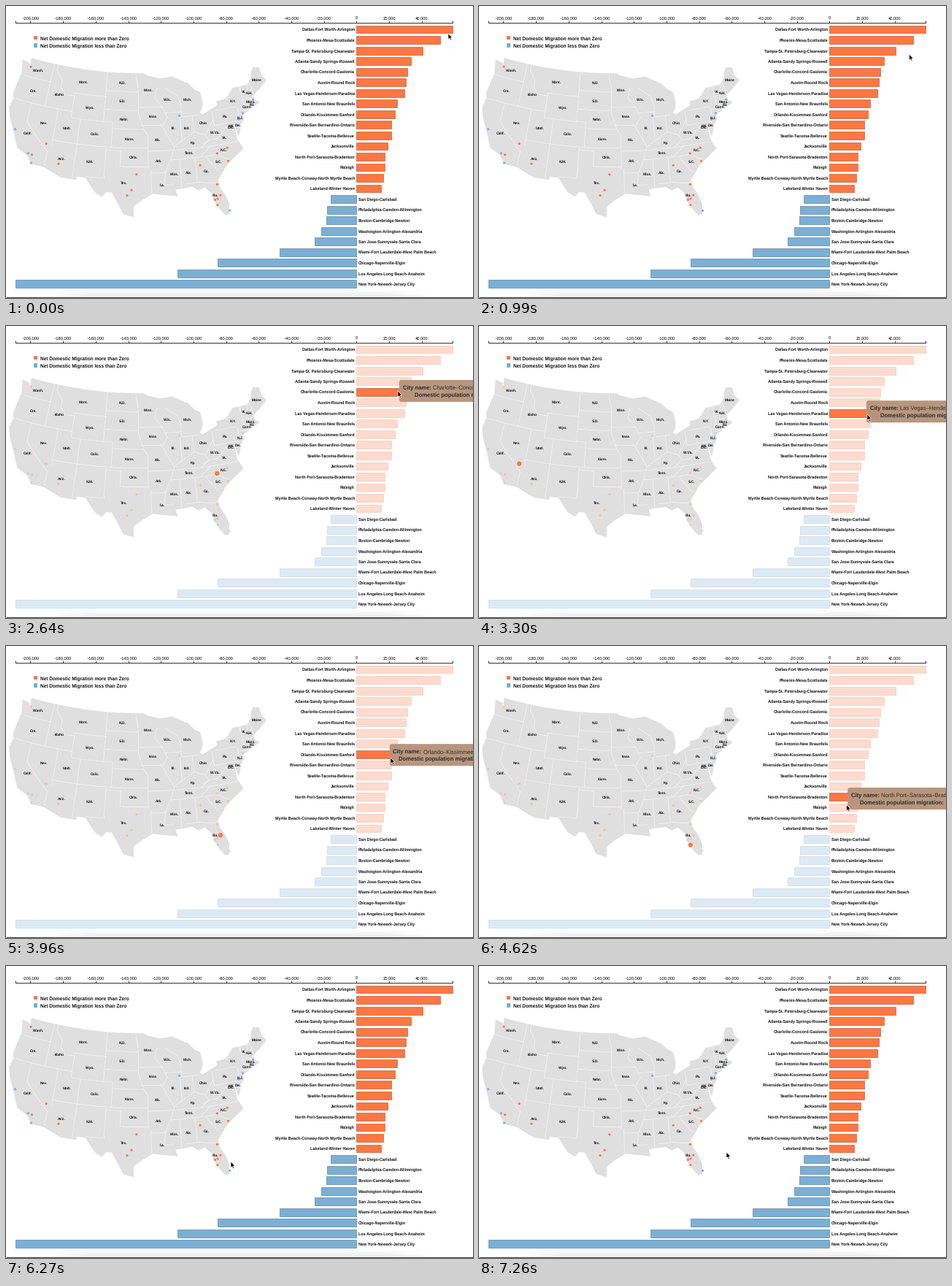
A matplotlib script that plays this animation: 640 by 400 pixels, repeating every 7590 ms.

```python
import numpy as np
import matplotlib
import matplotlib.pyplot as plt
from matplotlib.animation import FuncAnimation
from matplotlib.colors import to_rgb
from matplotlib.patches import Circle, FancyBboxPatch, Polygon, Rectangle

matplotlib.rcParams["font.family"] = "Liberation Sans"
matplotlib.rcParams["text.hinting"] = "none"

W, H, DPI = 640, 400, 100
FRAMES, STEP = 23, 330
PX = 72 / DPI
ORANGE, BLUE = "#ff7743", "#7bafd4"
LAND, TIP, INK = "#dfdfdf", "#b6937a", "#111111"
ZERO, UNIT = 480.4, 2.235 / 1000
BAR_H = 10.8
LAG = 0.3  # the page answers the pointer this many steps late

# name, state, migration, longitude, latitude
CITIES = [
    ("Dallas-Fort Worth-Arlington", "TX", 58849, -96.8, 32.8),
    ("Phoenix-Mesa-Scottsdale", "AZ", 51311, -112, 33.4),
    ("Tampa-St. Petersburg-Clearwater", "FL", 40502, -82.5, 27.9),
    ("Atlanta-Sandy Springs-Roswell", "GA", 33203, -84.4, 33.7),
    ("Charlotte-Concord-Gastonia", "NC–SC", 31190, -80.8, 35.2),
    ("Austin-Round Rock", "TX", 30103, -97.7, 30.3),
    ("Las Vegas-Henderson-Paradise", "NV", 29408, -115.1, 36.2),
    ("San Antonio-New Braunfels", "TX", 24890, -98.5, 29.4),
    ("Orlando-Kissimmee-Sanford", "FL", 23318, -81.4, 28.5),
    ("Riverside-San Bernardino-Ontario", "CA", 21304, -117.4, 34),
    ("Seattle-Tacoma-Bellevue", "WA", 21099, -122.3, 47.6),
    ("Jacksonville", "FL", 18858, -81.7, 30.3),
    ("North Port-Sarasota-Bradenton", "FL", 17363, -82.2, 27),
    ("Raleigh", "NC", 17251, -78.6, 35.8),
    ("Myrtle Beach-Conway-North Myrtle Beach", "SC–NC", 16463, -78.9, 33.7),
    ("Lakeland-Winter Haven", "FL", 15102, -82, 28),
    ("San Diego-Carlsbad", "CA", -15822, -117.2, 32.7),
    ("Philadelphia-Camden-Wilmington", "PA–NJ–DE–MD", -18288, -75.2, 39.9),
    ("Boston-Cambridge-Newton", "MA–NH", -18304, -71.1, 42.4),
    ("Washington-Arlington-Alexandria", "DC–VA–MD–WV", -21620, -77, 38.9),
    ("San Jose-Sunnyvale-Santa Clara", "CA", -25803, -121.9, 37.3),
    ("Miami-Fort Lauderdale-West Palm Beach", "FL", -47177, -80.2, 25.8),
    ("Chicago-Naperville-Elgin", "IL–IN–WI", -85308, -87.6, 41.9),
    ("Los Angeles-Long Beach-Anaheim", "CA", -109805, -118.2, 34.1),
    ("New York-Newark-Jersey City", "NY–NJ–PA", -209000, -74, 40.7),
]

STATES = [
    ("Wash.", 44, 88), ("Ore.", 37, 116), ("Idaho", 73, 121), ("Mont.", 106, 104),
    ("N.D.", 159, 105), ("S.D.", 159, 130), ("Minn.", 195, 115), ("Wis.", 221, 128),
    ("Mich.", 249, 128), ("Maine", 343, 101), ("N.Y.", 311, 130), ("Vt.", 326, 117),
    ("N.H.", 333, 119), ("Mass.", 335, 131), ("Conn.", 330, 138), ("R.I.", 337, 135),
    ("Pa.", 300, 151), ("N.J.", 321, 153), ("Del.", 318, 163), ("Md.", 309, 164),
    ("D.C.", 308, 166), ("Ohio", 270, 160), ("Ind.", 248, 167), ("Ill.", 229, 167),
    ("Iowa", 201, 151), ("Nebr.", 161, 155), ("Wyo.", 114, 139), ("Nev.", 51, 160),
    ("Utah", 83, 167), ("Calif.", 29, 174), ("Colo.", 122, 175), ("Kans.", 169, 182),
    ("Mo.", 208, 183), ("Ky.", 256, 187), ("W.Va.", 286, 173), ("Va.", 299, 180),
    ("N.C.", 298, 197), ("S.C.", 291, 213), ("Tenn.", 251, 201), ("Ga.", 274, 226),
    ("Ala.", 250, 228), ("Miss.", 230, 230), ("Ark.", 209, 212), ("Okla.", 174, 207),
    ("La.", 214, 245), ("Tex.", 161, 242), ("Fla.", 287, 259), ("Ariz.", 76, 209),
    ("N.M.", 115, 213),
]

# outline as (longitude, latitude), clockwise from the northwest
NORTH = [
    (-124.7, 48.4), (-122.8, 48.1), (-122.4, 47.4), (-122.8, 49), (-95.2, 49),
    (-94.6, 48.7), (-91.5, 48.1), (-88.4, 48.3), (-84.9, 46.9), (-83.5, 45.8),
    (-82.4, 45.3), (-82.1, 43.6), (-82.5, 42.6), (-83.1, 42), (-82.5, 41.7),
    (-79, 42.8), (-79.2, 43.4), (-76.8, 43.6), (-75, 45), (-71.5, 45),
    (-70.3, 45.9), (-70, 46.7), (-69.2, 47.4), (-67.8, 47.1), (-67.8, 45.7),
]
ATLANTIC = [
    (-67, 44.8), (-70.6, 43.1), (-71, 42.3), (-70.1, 42), (-70, 41.6),
    (-73.6, 41), (-72, 41), (-74, 40.5), (-74.1, 39.7), (-74.9, 39),
    (-75.4, 39.5), (-75.1, 38.5), (-75.9, 37.2), (-76.3, 39.3), (-76.3, 37),
    (-75.5, 35.2), (-77.9, 33.9), (-79.2, 33.2), (-81.4, 31), (-81.3, 29.8),
    (-80.5, 28.4), (-80.1, 26.9), (-80.4, 25.2), (-81.1, 25.2),
]
SOUTH_WEST = [
    (-81.8, 26.1), (-82.8, 27.9), (-82.7, 28.8), (-84.1, 30.1), (-85.2, 29.7),
    (-86.3, 30.4), (-89.5, 30.2), (-89.2, 29.1), (-91.3, 29.4), (-93.8, 29.7),
    (-95.9, 28.6), (-97.3, 27.6), (-97.2, 25.9), (-99.1, 26.4), (-100.3, 28.3),
    (-101.4, 29.8), (-102.4, 29.8), (-103.1, 29), (-104.5, 29.6), (-106.5, 31.8),
    (-108.2, 31.8), (-108.2, 31.3), (-111.1, 31.3), (-114.8, 32.5), (-117.1, 32.5),
    (-118.4, 33.8), (-120.5, 34.5), (-121.9, 36.6), (-123.7, 39), (-124.4, 40.4),
    (-124.1, 42), (-124.5, 42.8), (-124, 46.2),
]

# state lines along a parallel: latitude, from, to
PARALLELS = [
    (46, -124, -117), (42, -124.2, -111), (45, -111, -104), (41, -111, -102),
    (37, -114, -94.6), (46, -104, -96.5), (43, -104, -96.5), (40, -102, -95.3),
    (36.5, -103, -100), (34, -100, -94.5), (32, -106.6, -103), (43.5, -96.5, -91.2),
    (40.6, -95.8, -91.4), (36.5, -94.6, -76), (33, -94, -91.2), (35, -90.1, -83.1),
    (42.5, -90.6, -87), (41.7, -87, -83.4), (39.7, -80.5, -75.4), (42, -79.8, -75.3),
    (42.7, -73.3, -70.8), (42, -73.5, -71.4), (31, -91.6, -89.7), (31, -87.6, -85),
]
# state lines along a meridian: longitude, from, to
MERIDIANS = [
    (-117, 42, 49), (-111, 41, 45), (-104, 41, 49), (-102, 37, 41), (-109, 31.3, 41),
    (-114, 36, 42), (-120, 39, 42), (-103, 32, 37), (-100, 34, 36.5),
    (-94.5, 33.6, 39.1), (-94, 29.7, 33.6), (-87.5, 38, 41.7), (-84.8, 39.1, 41.7),
    (-80.5, 39.7, 42), (-88.3, 30.3, 35), (-85.3, 31, 35), (-73.4, 41, 45),
    (-75.7, 38.5, 39.7),
]
# rivers and ridges
WINDING = [
    [(-120, 39), (-114.6, 35), (-114.7, 32.7)],
    [(-116, 49), (-116, 48), (-114.4, 46.6), (-114.4, 45.5), (-113, 44.5), (-111, 44.5)],
    [(-97.2, 49), (-96.5, 46), (-96.5, 42.5), (-95.3, 40), (-94.6, 39.1)],
    [(-92.1, 46.7), (-92.8, 45), (-91.2, 43.5), (-90.2, 41.8), (-91.4, 40.4),
     (-89.2, 37), (-90.1, 35), (-91.2, 33), (-91.6, 31)],
    [(-90.4, 46.5), (-87.6, 45.1), (-87, 43.5), (-87.2, 41.7)],
    [(-89.2, 37), (-87.5, 37.9), (-84.8, 39.1), (-82.6, 38.4), (-80.5, 40.6)],
    [(-82.6, 38.4), (-82, 37.5), (-80.3, 37.5), (-77.8, 39.3), (-76.3, 38)],
    [(-84.3, 35), (-81.7, 36.6)],
    [(-83.7, 36.6), (-82, 37.5)],
    [(-83.1, 35), (-81, 35.1), (-78.6, 33.9)],
    [(-83.1, 35), (-80.9, 32.1)],
    [(-85, 31), (-82.2, 30.6), (-81.4, 30.7)],
    [(-75.3, 42), (-74.7, 41.4), (-75.4, 39.7)],
    [(-71.5, 45), (-72.5, 42.7)],
    [(-71, 45.3), (-70.7, 43.1)],
]

# pointer path: step, x, y
PATH = np.array([
    (0, 606, 37.6), (1, 597, 33), (3, 589.5, 66), (5, 546, 77), (6, 562, 82),
    (8, 537, 89), (12, 527, 153), (15, 492, 250), (16, 329.5, 273),
    (16.7, 294, 259), (18.7, 309, 276), (19, 308, 268), (22, 339, 255),
])
ARROW = np.array([(0, 0), (0, 8.2), (1.9, 6.5), (3.2, 9.4), (4.5, 8.8),
                  (3.3, 6), (5.8, 5.9)])


def project(points):
    """Albers equal-area conic, scaled to the stage; long lines stay curved."""
    lon, lat = np.array(points, float).T
    t = np.arange(len(lon))
    fine = np.linspace(0, t[-1], t[-1] * 12 + 1)
    lon, lat = np.interp(fine, t, lon), np.interp(fine, t, lat)
    s1, s2 = np.sin(np.radians([29.5, 45.5]))
    n = (s1 + s2) / 2
    rho = np.sqrt(1 - s1 ** 2 + 2 * n * s1 - 2 * n * np.sin(np.radians(lat))) / n
    theta = n * np.radians(lon + 96)
    return np.column_stack((184.6 + 489 * rho * np.sin(theta),
                            -445.5 + 488 * rho * np.cos(theta)))


def label(x, y, text, px, ha="left", weight="bold", color=INK, z=5):
    """Text whose capitals are centred on y."""
    return ax.text(x, y + 0.38 * px, text, fontsize=px * PX, ha=ha,
                   va="baseline", weight=weight, color=color, zorder=z)


def line(xs, ys, color, px, z=2):
    ax.plot(xs, ys, color=color, lw=px * PX, zorder=z, solid_capstyle="butt")


def shade(color, k=0.68):
    return tuple(k * c for c in to_rgb(color))


def bar_y(i):
    return 32.1 + 14.53 * i


fig = plt.figure(figsize=(W / DPI, H / DPI), dpi=DPI, facecolor="white")
ax = fig.add_axes([0, 0, 1, 1])

# soft shadow and rule along the bottom edge
gx = np.linspace(0, W, 320)
edge = np.clip((gx - 55) / 60, 0, 1) * np.clip((585 - gx) / 60, 0, 1)
shadow = np.zeros((20, 320, 4))
shadow[..., 3] = 0.07 * np.linspace(0, 1, 20)[:, None] * edge
ax.imshow(shadow, extent=(0, W, 398, 387), aspect="auto", zorder=0)
line([0, W], [399, 399], "#444444", 1.2)
ax.set(xlim=(0, W), ylim=(H, 0))
ax.axis("off")

# map
ax.add_patch(Polygon(project(NORTH + ATLANTIC + SOUTH_WEST), fc=LAND, ec="none", zorder=1))
borders = [[(a, lat), (b, lat)] for lat, a, b in PARALLELS]
borders += [[(lon, a), (lon, b)] for lon, a, b in MERIDIANS]
for border in borders + WINDING:
    line(*project(border).T, "#f6f6f6", 0.7)
for name, x, y in STATES:
    label(x + 0.3, y + 0.3, name, 4.9, "center")

# axis
line([13.3, 13.3, 612, 612], [20, 23, 23, 20], "black", 0.8)
for value in range(-200000, 40001, 20000):
    x = ZERO + value * UNIT
    line([x, x], [20, 23], "black", 0.7)
    label(x, 16, f"{value:,}".replace("-", "−"), 5.8, "center", "normal", "black")

# legend
for y, color, word in ((43.6, ORANGE, "more"), (54.2, BLUE, "less")):
    ax.add_patch(Rectangle((37.7, y - 2.8), 5.6, 5.6, fc=color, ec="none"))
    label(47.3, y, f"Net Domestic Migration {word} than Zero", 6.56)

bars, dots = [], []
for i, (name, _, value, lon, lat) in enumerate(CITIES):
    gain = value > 0
    color = ORANGE if gain else BLUE
    bar = Rectangle((ZERO, bar_y(i) - BAR_H / 2), value * UNIT, BAR_H, fc=color,
                    ec=shade(color), lw=0.6 * PX, zorder=3)
    dot = Circle(project([(lon, lat)])[0], 1.6, fc=color, ec="none", zorder=4)
    bars.append(ax.add_patch(bar))
    dots.append(ax.add_patch(dot))
    label(478 if gain else 483, bar_y(i), name, 5.56, "right" if gain else "left")

# tooltip and pointer
box = ax.add_patch(FancyBboxPatch((0, 0), 1, 1, boxstyle="round,pad=0,rounding_size=3",
                                  fc=TIP, ec="none", alpha=0.97, zorder=8))


def tip_text(text, weight="normal"):
    return label(0, 0, text, 7.6, weight=weight, color="#2c2c2c", z=9)


rows = [(tip_text("City name:", "bold"), tip_text("")),
        (tip_text("Domestic population migration:", "bold"), tip_text(""))]
tooltip = [box, *rows[0], *rows[1]]
pointer = ax.add_patch(Polygon(ARROW, fc="black", ec="white", lw=0.6 * PX, zorder=10))


def pointer_at(t):
    return np.array([np.interp(t, PATH[:, 0], PATH[:, k]) for k in (1, 2)])


def city_under(pos):
    """Index of the city whose bar or dot lies under the point."""
    x, y = pos
    for i, (city, dot) in enumerate(zip(CITIES, dots)):
        end = ZERO + city[2] * UNIT
        on_bar = min(ZERO, end) < x < max(ZERO, end) and abs(y - bar_y(i)) < BAR_H / 2
        if on_bar or np.hypot(*(pos - dot.center)) < 4.5:
            return i
    return None


def place_tooltip(city, pos):
    name, state, value = CITIES[city][:3]
    rows[0][1].set_text(f"{name.replace('-', '–')}, {state}")
    rows[1][1].set_text(str(value).replace("-", "−"))
    left, top = pos - (2, 14)
    gap = 2.2
    sizes = [[part.get_window_extent().width for part in row] for row in rows]
    width = max(sum(size) for size in sizes) + gap + 9.5
    box.set_bounds(left, top, width, 30)
    for k, ((key, entry), (a, b)) in enumerate(zip(rows, sizes)):
        x, y = left + (width - a - gap - b) / 2, top + 13.3 + 10 * k
        key.set_position((x, y))
        entry.set_position((x + a + gap, y))


def update(i):
    seen = pointer_at(i - LAG)
    city = city_under(seen)
    for k, (bar, dot) in enumerate(zip(bars, dots)):
        alpha = 1 if city in (None, k) else 0.26
        bar.set_alpha(alpha)
        dot.set_alpha(alpha)
        dot.set_radius(3.2 if k == city else 1.6)
    for part in tooltip:
        part.set_visible(city is not None)
    if city is not None:
        place_tooltip(city, seen)
    pointer.set_xy(ARROW + pointer_at(i))
    return bars + dots + tooltip + [pointer]


anim = FuncAnimation(fig, update, frames=FRAMES, interval=STEP, repeat=True,
                     repeat_delay=0, blit=False)
plt.show()
```
